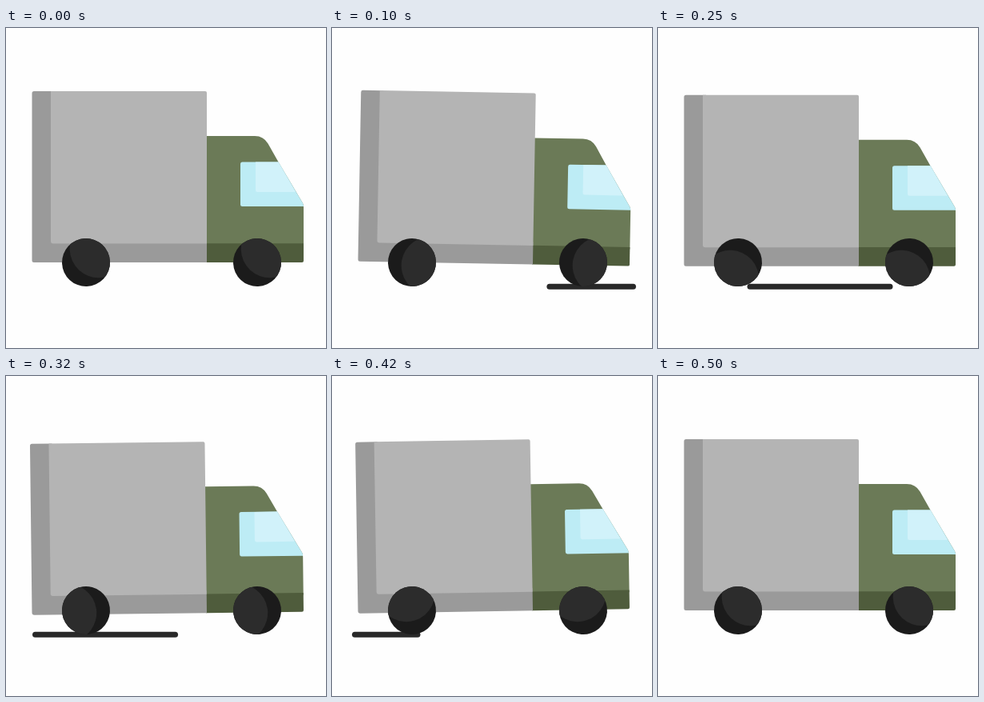
An HTML page that plays this animation: 400x400 px, repeating every 520 ms.

```html
<!DOCTYPE html>
<html lang="en">
<head>
<meta charset="utf-8">
<title>Driving truck</title>
<style>
  html, body { margin: 0; width: 100%; height: 100%; overflow: hidden; background: #fefefe; }
  svg { display: block; width: 100%; height: 100%; }
</style>
</head>
<body>
<svg viewBox="0 0 400 400">
  <defs>
    <clipPath id="tyre"><circle r="30"/></clipPath>
    <g id="wheel">
      <circle r="30" fill="#1b1b1b"/>
      <circle cx="-23" r="36" fill="#2c2c2c" clip-path="url(#tyre)"/>
    </g>
  </defs>
  <g id="body">
    <path fill="#6b7a57" d="M250 135H311Q322 135 327.500 144.500L340.500 167.500L371 219Q372 221 372 224V272H250Z"/>
    <path fill="#4f5c3c" d="M250 269.300H372V291Q372 293 370 293H250Z"/>
    <path fill="#bdecf5" d="M295.500 167.500H340.500L371 219Q372 221 372 223H295.500Q293 223 293 220.500V170Q293 167.500 295.500 167.500Z"/>
    <path fill="#d1f2fa" d="M312 167.500H340.500L362 205H314.500Q312 205 312 202.500Z"/>
    <path fill="#9a9a9a" d="M35 79H60V265H251V293H35Q32.500 293 32.500 290.500V81.500Q32.500 79 35 79Z"/>
    <path fill="#b4b4b4" d="M56 79H249Q251 79 251 81V269.500H59Q56 269.500 56 266.500Z"/>
  </g>
  <path id="road" fill="none" stroke="#282828" stroke-width="7" stroke-linecap="round"/>
  <use id="rear" href="#wheel"/>
  <use id="front" href="#wheel"/>
</svg>
<script>
const LOOP = 520, STEPS = 20;
const ROAD_LEFT = 28.5, ROAD_RIGHT = 376.5, ROAD_SPEED = 26.15;
const [body, road, rear, front] =
  ["body", "road", "rear", "front"].map(id => document.getElementById(id));

// 25 ms steps, with their starts rounded down to 10 ms
function stepAt(ms) {
  return Math.min(STEPS, Math.floor((Math.floor(ms / 10) + 0.5) / 2.5));
}

function drawBody(phase) {
  const a = phase * 2 * Math.PI;
  const tilt = 0.99 * Math.sin(a) + 0.12 * Math.sin(2 * a);
  const drop = 2.35 * (1 - Math.cos(a));
  body.setAttribute("transform", `translate(0 ${drop}) rotate(${tilt} 202 292)`);
}

function drawWheels(phase) {
  const turn = 133 + 360 * Math.pow(phase, 1.15);
  // The lit disc lies on the -x side, so the shade points along +x
  rear.setAttribute("transform", `translate(100 293) rotate(${turn})`);
  front.setAttribute("transform", `translate(314 293) rotate(${turn})`);
}

function drawRoad(step) {
  const from = Math.max(ROAD_LEFT, ROAD_RIGHT - ROAD_SPEED * step);
  const to = Math.min(ROAD_RIGHT, ROAD_LEFT + ROAD_SPEED * (STEPS - step));
  const shown = step > 0 && step < STEPS;
  road.setAttribute("d", shown ? `M${from} 323.300H${to}` : "");
}

function draw(ms) {
  const step = stepAt(ms % LOOP);
  const phase = step / STEPS;
  drawBody(phase);
  drawWheels(phase);
  drawRoad(step);
}

const start = performance.now();
function tick() {
  draw(performance.now() - start);
  requestAnimationFrame(tick);
}
draw(0);
requestAnimationFrame(tick);
</script>
</body>
</html>
```
